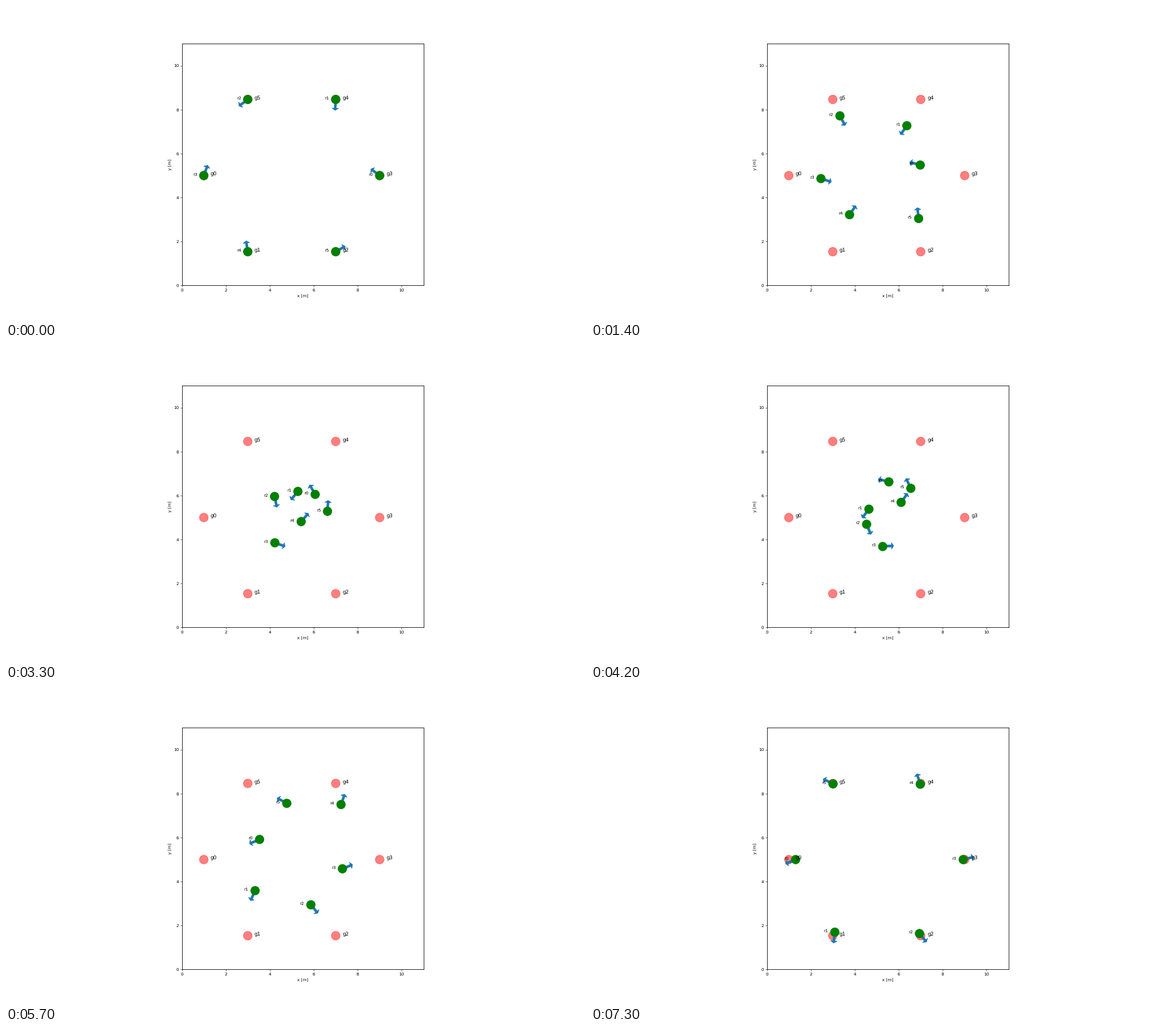
Recreate the animation shown at these times as a matplotlib script. Size 1016 px wide and 551 px high, loop 8000 ms.

```python
import numpy as np
import matplotlib.pyplot as plt
from matplotlib.animation import FuncAnimation
from matplotlib.patches import Circle, Polygon

W, H = 1016, 551
DPI = W / 19.2
FRAMES, INTERVAL = 80, 100
TRAVEL = 72          # frames from start to goal
TURN_IN = 12         # frames spent turning towards the path
CENTER, RING = 5 + 5j, 4
RADIUS = 0.2

plt.rcParams["font.family"] = "DejaVu Sans"
plt.rcParams["text.hinting"] = "none"

# Each robot passes four evenly timed points on its way around the others.
VIA = [
    [6.94 + 5.49j, 6.26 + 5.80j, 5.44 + 6.64j, 3.45 + 5.88j],
    [6.35 + 7.24j, 5.55 + 6.50j, 4.55 + 5.26j, 3.30 + 3.51j],
    [3.34 + 7.69j, 4.07 + 6.48j, 4.61 + 4.54j, 5.92 + 2.88j],
    [2.50 + 4.85j, 3.79 + 4.02j, 5.42 + 3.70j, 7.38 + 4.61j],
    [3.79 + 3.26j, 5.09 + 4.44j, 6.20 + 5.82j, 7.26 + 7.56j],
    [6.90 + 3.09j, 6.63 + 4.78j, 6.48 + 6.45j, 4.70 + 7.60j],
]
START_HEADINGS = np.radians([143, -93, -143, 70, 99, 30])

# Unit arrow along the real axis, shaped from its upper half.
HALF_ARROW = np.array([0.05j, 0.4 + 0.05j, 0.4 + 0.15j, 0.5])
ARROW = np.concatenate([HALF_ARROW, HALF_ARROW[-2::-1].conj()])


def xy(z):
    return np.column_stack([np.real(z), np.imag(z)])


def ring_point(k, radius=RING):
    return CENTER + radius * np.exp(1j * np.pi * k / 3)


def catmull_rom(points, u):
    """Position and velocity on the curve through points, u from 0 to 1."""
    p = np.concatenate([[2 * points[0] - points[1]], points,
                        [2 * points[-1] - points[-2]]])
    legs = len(points) - 1
    i = min(int(u * legs), legs - 1)
    s = u * legs - i
    a, b, c, d = p[i:i + 4]
    cubic = [-a + 3 * b - 3 * c + d, 2 * a - 5 * b + 4 * c - d, c - a, 2 * b]
    return np.polyval(cubic, s) / 2, np.polyval(np.polyder(cubic), s) / 2


class Robot:
    def __init__(self, ax, k):
        # The first robots have the most distance left at the end.
        stop = ring_point(k + 3, RING - 0.31 * 0.6 ** k)
        self.points = np.array([ring_point(k), *VIA[k], stop])
        first = self.points[1] - self.points[0]
        self.swing = np.angle(np.exp(1j * START_HEADINGS[k]) / first)
        self.arrow = ax.add_patch(Polygon(xy(ARROW), color="C0", lw=1))
        self.body = ax.add_patch(Circle((0, 0), RADIUS, color="green"))
        self.label = ax.text(0, 0, f"r{k}", fontsize=10)

    def move(self, t):
        pos, vel = catmull_rom(self.points, min(t / TRAVEL, 1))
        turn = self.swing * max(0, 1 - t / TURN_IN)
        heading = vel / abs(vel) * np.exp(1j * turn)
        self.arrow.set_xy(xy(pos + ARROW * heading))
        self.body.center = pos.real, pos.imag
        self.label.set_position((pos.real - 0.5, pos.imag))
        return self.arrow, self.body, self.label


fig, ax = plt.subplots(figsize=((W + 1e-4) / DPI, (H + 1e-4) / DPI), dpi=DPI)
ax.set(xlim=(0, 11), ylim=(0, 11), ylabel="y [m]", aspect="equal",
       xticks=range(0, 11, 2), yticks=range(0, 11, 2))
ax.set_xlabel("x [m]", labelpad=5)
plt.setp(ax.spines.values(), linewidth=1.2)

for k in range(6):
    goal = ring_point(k + 3)
    ax.add_patch(Circle((goal.real, goal.imag), RADIUS, color="red", alpha=0.5))
    ax.text(goal.real + 0.3, goal.imag, f"g{k}", fontsize=12)

robots = [Robot(ax, k) for k in range(6)]


def draw(frame):
    return [artist for robot in robots for artist in robot.move(frame)]


anim = FuncAnimation(fig, draw, frames=FRAMES, interval=INTERVAL,
                     repeat=True, repeat_delay=0, blit=False)
plt.show()
```
